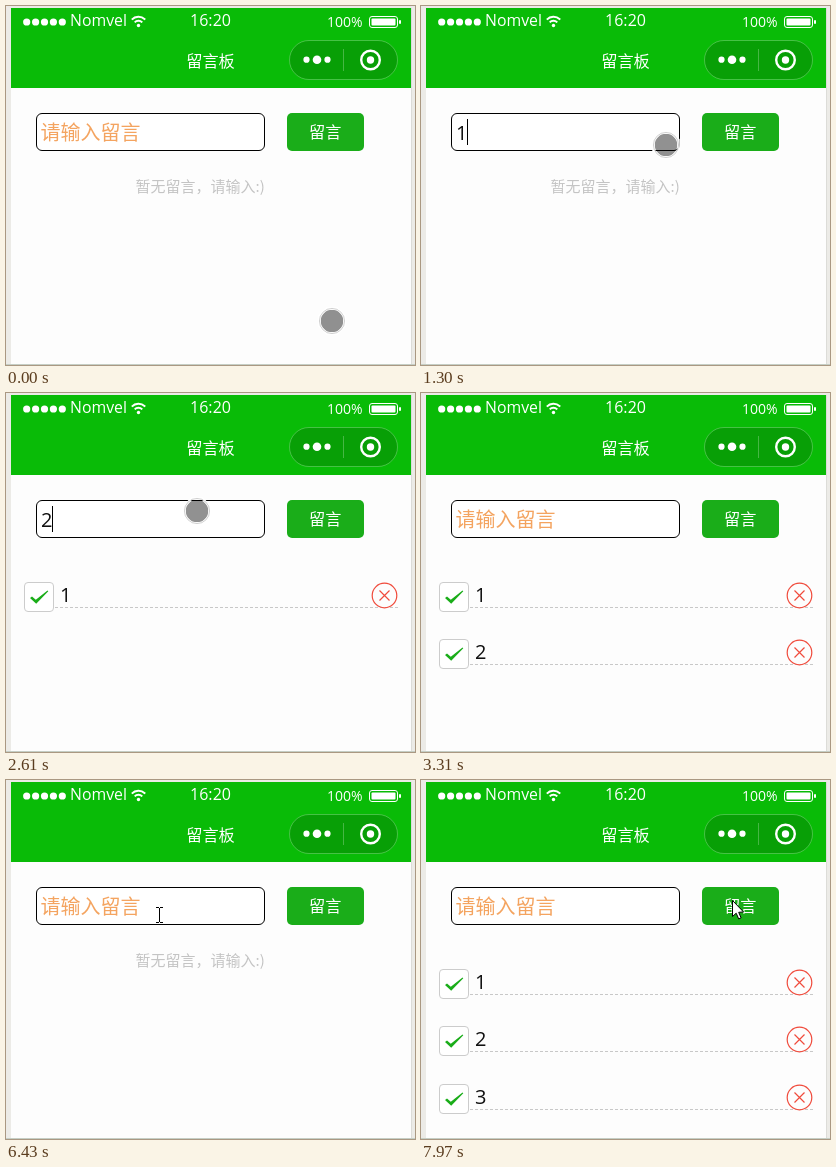
Animation of 409 by 359 pixels, one loop 8 s. Source, as an HTML page with a canvas:

```html
<!DOCTYPE html>
<html lang="zh-CN">
<head>
<meta charset="utf-8">
<title>留言板</title>
<style>
html, body { margin: 0; width: 100%; height: 100%; overflow: hidden; background: #ecebe7; }
canvas { display: block; width: 409px; height: 359px; }
</style>
</head>
<body>
<canvas id="stage"></canvas>
<script>
const W = 409, H = 359, LOOP = 8000, STEP = 76.5;
const canvas = document.getElementById('stage');
const ctx = canvas.getContext('2d');
const dpr = window.devicePixelRatio || 1;
canvas.width = W * dpr;
canvas.height = H * dpr;

const LATIN = '"Open Sans", "Noto Sans", sans-serif';
const CJK = '"Noto Sans CJK SC", "Noto Sans CJK", sans-serif';
const GREEN = '#09bb07', BUTTON = '#1aad19', RED = '#f04b3c';

// Life of each message: input focused, digit typed, button pressed, row added.
const messages = [
  { focus: 610, type: 1070, press: 1530, add: 1690 },
  { focus: 2150, type: 2530, press: 3080, add: 3160 },
  { focus: 6660, type: 7130, press: 7740, add: 7890 }
];
const RELOAD = 5180, SHOWN = 6430, RESTORED = 6500;
const TOUCH_END = 3310, ARROW_START = 5880;
const BLINK = 270;

// Each move eases to (x, y); bend bows the path downwards.
const touch = {
  x: 327, y: 317, moves: [
    { from: 0, to: 150, x: 168, y: 91 },
    { from: 225, to: 380, x: 158, y: 126 },
    { from: 450, to: 690, x: 170, y: 128 },
    { from: 1070, to: 1530, x: 312, y: 128, bend: 11 },
    { from: 1690, to: 2070, x: 178, y: 117 },
    { from: 2530, to: 2930, x: 310, y: 125 }
  ]
};
const arrow = {
  x: 256, y: 49, moves: [
    { from: 5880, to: 6260, x: 153, y: 134 },
    { from: 7130, to: 7590, x: 311, y: 120 }
  ]
};

function positionAt(path, t) {
  // The cursor advances in steps of the recorder's frame length.
  const now = Math.floor((t + 4) / STEP) * STEP;
  let { x, y } = path;
  for (const m of path.moves) {
    const p = Math.min(1, Math.max(0, (now + 8 - m.from) / (m.to - m.from)));
    const e = p * p * (3 - 2 * p);
    x += (m.x - x) * e;
    y += (m.y - y) * e + (m.bend || 0) * Math.sin(Math.PI * p);
  }
  return { x: Math.round(x), y: Math.round(y) };
}

function formAt(t) {
  const i = messages.findIndex(m => t >= m.focus && t < m.add);
  const m = messages[i];
  const typed = Boolean(m) && t >= m.type;
  const press = Boolean(m) && t >= m.press;
  const empty = t >= SHOWN && t < RESTORED;
  return {
    text: typed ? String(i + 1) : '',
    press,
    caret: Boolean(m) && !press && (typed || t < m.focus + BLINK),
    rows: empty ? 0 : messages.filter(msg => t >= msg.add).length
  };
}

function text(str, x, y, size, color, font = CJK, align = 'left', weight = 400) {
  ctx.font = `${weight} ${size}px ${font}`;
  ctx.textAlign = align;
  ctx.fillStyle = color;
  ctx.fillText(str, x, y);
}

function paint(fill, stroke, width = 1) {
  if (fill) { ctx.fillStyle = fill; ctx.fill(); }
  if (stroke) { ctx.strokeStyle = stroke; ctx.lineWidth = width; ctx.stroke(); }
}

function box(x, y, w, h, r, fill, stroke) {
  ctx.beginPath();
  ctx.roundRect(x, y, w, h, r);
  paint(fill, stroke);
}

function circle(x, y, r, fill, stroke, width) {
  ctx.beginPath();
  ctx.arc(x, y, r, 0, Math.PI * 2);
  paint(fill, stroke, width);
}

function shape(path, x, y, fill, stroke, width) {
  ctx.save();
  ctx.translate(x, y);
  const p = new Path2D(path);
  if (fill) { ctx.fillStyle = fill; ctx.fill(p); }
  if (stroke) { ctx.strokeStyle = stroke; ctx.lineWidth = width; ctx.stroke(p); }
  ctx.restore();
}

function rect(x, y, w, h, color) {
  ctx.fillStyle = color;
  ctx.fillRect(x, y, w, h);
}

function drawWifi(x, y) {
  circle(x, y - 0.5, 1.7, '#fff');
  for (const r of [5.2, 9.2]) {
    ctx.beginPath();
    ctx.arc(x, y, r, -Math.PI * 0.76, -Math.PI * 0.24);
    paint(null, '#fff', 1.9);
  }
}

function drawHeader() {
  rect(5, 2, 400, 80, GREEN);
  for (let i = 0; i < 5; i++) circle(20.7 + i * 8.9, 16, 3.6, '#fff');
  text('Nomvel', 64, 20, 15.8, '#fff', LATIN, 'left', 500);
  drawWifi(132.5, 20);
  text('16:20', 204.5, 20, 16, '#fff', LATIN, 'center', 500);
  text('100%', 321, 21, 14, '#fff', LATIN, 'left', 500);
  box(363.5, 10.5, 28, 11, 2.5, null, '#fff');
  box(365.5, 12.5, 24, 7, 1, '#fff');
  box(393, 14, 2, 4, 1, '#fff');
  text('留言板', 204.5, 61, 16.2, '#fff', CJK, 'center');

  box(283.5, 34.5, 108, 39, 19.5, 'rgba(0,0,0,.15)', 'rgba(255,255,255,.25)');
  rect(337, 43, 1, 22, 'rgba(255,255,255,.25)');
  for (const i of [-1, 0, 1]) circle(311 + i * 10.5, 53.7, i ? 3.1 : 4.3, '#fff');
  circle(364.5, 54, 9.3, null, '#fff', 2.4);
  circle(364.5, 54, 3.7, '#fff');
}

function drawForm(s) {
  box(30.5, 107.5, 228, 37, 5.5, '#fff', '#000');
  if (s.text) text(s.text, 35, 134, 20, '#111', LATIN);
  else text('请输入留言', 34.4, 134, 20, '#f4a460');
  if (s.caret) rect(s.text ? 46 : 35, 113, 1, 26, '#000');

  box(281, 107, 77, 38, 5, s.press ? '#179b16' : BUTTON);
  text('留言', 319.3, 132, 16.2, s.press ? 'rgba(255,255,255,.6)' : '#fff', CJK, 'center');
  if (!s.rows) text('暂无留言，请输入:)', 129.5, 186, 15, '#c4c4c4');
}

function drawRow(i) {
  const y = 189 + Math.round(i * 57.4);
  ctx.setLineDash([3, 2]);
  shape('M49 25.5H393', 0, y, null, '#c8c8c8', 1);
  ctx.setLineDash([]);
  box(18.5, y + 0.5, 29, 29, 3.5, '#fff', '#ccc');
  shape('M24 16l2-1.5 3.8 3.3 11.7-9.3 .8 .8-12.1 12.4z', 0, y, BUTTON);
  text(String(i + 1), 54, y + 20, 20, '#111', LATIN);
  circle(378.5, y + 13.5, 12.3, null, RED, 1.2);
  shape('M-5-5L5 5M5-5L-5 5', 378.5, y + 13.5, null, RED, 1.2);
}

function drawTouch(x, y) {
  circle(x, y, 11.3, 'rgba(0,0,0,.43)');
  ctx.beginPath();
  for (let i = 0; i < 8; i++) {
    const a = (i + 0.5) * Math.PI / 4;
    ctx.lineTo(x + 13.6 * Math.cos(a), y + 13.6 * Math.sin(a));
  }
  ctx.closePath();
  paint(null, '#fff', 2.4);
  circle(x, y, 12.6, null, 'rgba(90,90,90,.35)', 0.8);
}

function drawArrow(x, y) {
  shape('M0 0V16L3.7 12.7 6.2 18.4 8.6 17.4 6.2 11.8 11 11.4Z', x + 0.5, y + 0.5, '#fff', '#000', 1);
}

function drawBeam(x, y) {
  shape('M-3 0H0M1 0H4M-3 15H0M1 15H4M.5 .5V14.5', x, y - 6.5, null, '#000', 1);
}

function drawCursor(t) {
  if (t < TOUCH_END) {
    const { x, y } = positionAt(touch, t);
    drawTouch(x, y);
  } else if (t >= ARROW_START) {
    const { x, y } = positionAt(arrow, t);
    const overInput = t >= SHOWN && x < 259;
    (overInput ? drawBeam : drawArrow)(x, y);
  }
}

function draw(t) {
  ctx.setTransform(dpr, 0, 0, dpr, 0, 0);
  rect(0, 0, W, H, '#ecebe7');
  rect(5, 82, 400, 276, '#fdfdfd');
  rect(405, 2, 1, 356, '#dcdcd8');
  rect(0, 358, W, 1, '#c5cec5');
  drawHeader();
  if (t < RELOAD || t >= SHOWN) {
    const form = formAt(t);
    drawForm(form);
    for (let i = 0; i < form.rows; i++) drawRow(i);
  }
  drawCursor(t);
}

const start = performance.now();
function tick() {
  draw((performance.now() - start) % LOOP);
  requestAnimationFrame(tick);
}
tick();
</script>
</body>
</html>
```
